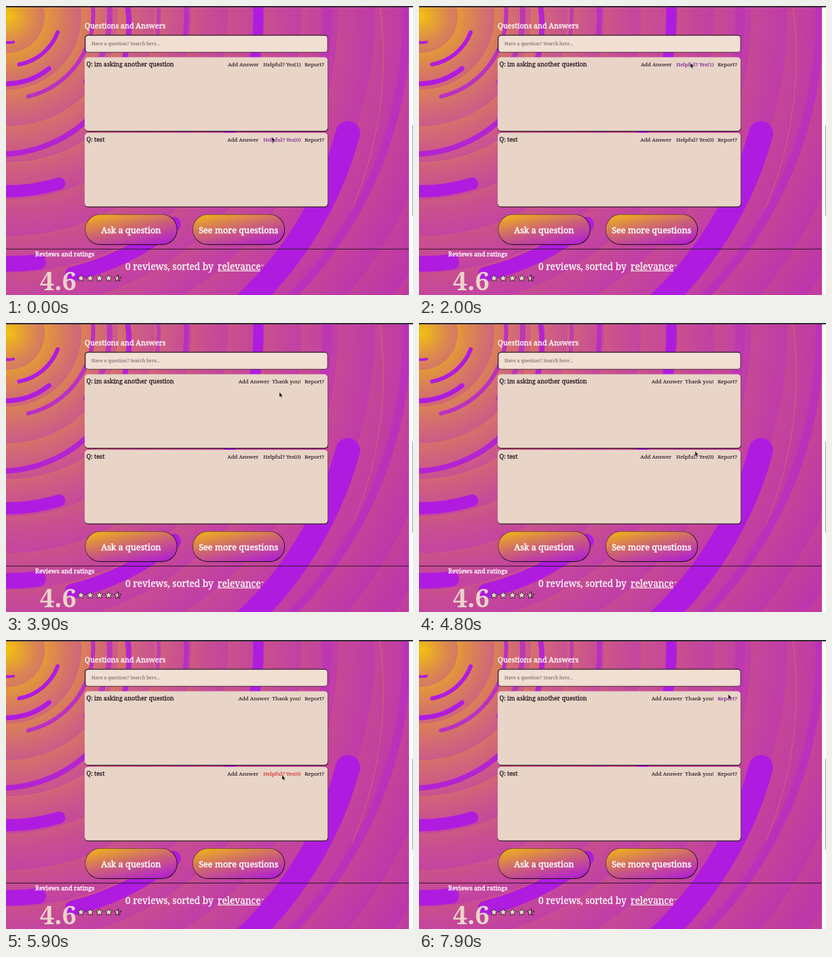
An HTML page that plays this animation: 600x426 px, repeating every 8000 ms.

```html
<!DOCTYPE html>
<html lang="en">
<head>
<meta charset="utf-8">
<title>Questions and Answers</title>
<style>
html, body { margin: 0; width: 100%; height: 100%; overflow: hidden; background: #fff; }
svg { display: block; width: 600px; height: 426px; }
text { font-family: "Noto Serif", "Liberation Serif", serif; fill: #2b1b24; stroke: #2b1b24; stroke-width: .12px; }
.white { fill: #fff; stroke: #fff; stroke-width: .35px; }
.q { font-size: 9px; stroke-width: .3px; }
.link { font-size: 7.85px; text-anchor: end; }
.hover { fill: #7a1a93; stroke: #7a1a93; }
.active { fill: #d32a2a; stroke: #d32a2a; }
.button { font-size: 12.7px; text-anchor: middle; stroke-width: .5px; }
.sort { font-size: 13.65px; stroke-width: .3px; }
</style>
</head>
<body>
<svg viewBox="0 0 600 426">
  <defs>
    <radialGradient id="base" gradientUnits="userSpaceOnUse" cx="3" cy="15" r="720">
      <stop offset="0" stop-color="#f3c30c"/>
      <stop offset=".055" stop-color="#e5a02f"/>
      <stop offset=".13" stop-color="#dc8551"/>
      <stop offset=".25" stop-color="#d46c70"/>
      <stop offset=".4" stop-color="#cb5587"/>
      <stop offset=".65" stop-color="#c64a94"/>
      <stop offset="1" stop-color="#c23d9c"/>
    </radialGradient>
    <radialGradient id="rings" gradientUnits="userSpaceOnUse" cx="3" cy="15" r="54" spreadMethod="repeat">
      <stop offset="0" stop-color="#b01be0" stop-opacity="0"/>
      <stop offset="1" stop-color="#b01be0" stop-opacity=".26"/>
    </radialGradient>
    <linearGradient id="pill" x1=".12" y1="-.05" x2=".85" y2="1.05">
      <stop offset="0" stop-color="#efb615"/>
      <stop offset=".5" stop-color="#cc6076"/>
      <stop offset="1" stop-color="#b01cd8"/>
    </linearGradient>
    <clipPath id="page"><rect width="594" height="426"/></clipPath>
  </defs>

  <g clip-path="url(#page)">
    <rect width="594" height="426" fill="url(#base)"/>
    <rect width="594" height="426" fill="url(#rings)"/>
    <g id="arcs" fill="none" stroke-linecap="round"></g>
    <path d="M0 358.3H594" stroke="#2b1526" stroke-width="1"/>
  </g>
  <rect width="600" height="2" fill="#302a35"/>
  <rect x="598.8" y="175" width="1.2" height="134" fill="#aaa"/>

  <text class="white" x="116" y="33" font-size="10.7">Questions and Answers</text>
  <rect x="116" y="42.5" width="358.5" height="26" rx="5" fill="#2b1c24"/>
  <rect x="117.3" y="43.8" width="356.4" height="24" rx="4" fill="#f0dfd2"/>
  <text x="126" y="58.3" font-size="6.8" style="fill:#66575a;stroke:none">Have a question? Search here...</text>

  <g id="cards"></g>
  <g id="buttons"></g>

  <text class="white" x="43" y="369" font-size="9.1">Reviews and ratings</text>
  <text class="white sort" x="176" y="388.5">0 reviews, sorted by</text>
  <text class="white sort" x="312" y="388.5">relevance</text>
  <path d="M312 390.6H375M376.3 381.3l1.8 1.8 1.8-1.8" fill="none" stroke="#fff"/>
  <text x="50" y="419" font-size="38" font-weight="700" style="fill:#ead5ca;stroke:none">4.6</text>
  <g id="stars" stroke="#2b1b24" stroke-width="1.4" stroke-linejoin="round" paint-order="stroke"></g>
  <path id="cursor" d="M0 0V7.2L1.7 5.7 2.9 8.3 4.1 7.7 2.9 5.2H5Z" fill="#171119" stroke="#eee" stroke-width=".35"/>
</svg>
<script>
const $ = id => document.getElementById(id);
const CX = 3, CY = 15, LOOP = 8000;

// A ring segment between two polar points; unequal radii make it spiral.
function arc(r0, deg0, r1, deg1, width, colour = '#b01be0', opacity = 1) {
  const at = (r, deg) => {
    const a = deg * Math.PI / 180;
    return `${(CX + r * Math.cos(a)).toFixed(1)} ${(CY + r * Math.sin(a)).toFixed(1)}`;
  };
  const r = (r0 + r1) / 2;
  return `<path d="M${at(r0, deg0)}A${r} ${r} 0 0 1 ${at(r1, deg1)}" stroke="${colour}" stroke-width="${width}" opacity="${opacity}"/>`;
}

$('arcs').innerHTML = [
  [39, 78, 39, 100, 4], [77, 18, 73, 77, 6], [98, 52, 100, 100, 7],
  [126, -10, 122, 76, 6, '#b01be0', .75], [150, -10, 150, 40, 8, '#b01be0', .6],
  [176, -10, 205, 100, 8, '#b01be0', .85],
  [222, -10, 222, 8, 6, '#b01be0', .5], [263, -10, 263, 8, 7, '#b01be0', .6],
  [258, 73, 258, 100, 18], [369, -10, 369, 30, 15],
  [365, 83, 365, 100, 23], [392, 51.5, 392, 76, 22], [530, 19, 551, 52, 36],
  [588, -10, 588, 50, 12, '#b01be0', .3], [470, -10, 470, 15, 14, '#b01be0', .25],
  [546, -4, 581, 29, 1, '#dd8d45', .5], [216, 30, 216, 100, 1, '#dd8d45', .5]
].map(a => arc(...a)).join('');

const card = (y, title, i) => `
  <rect x="116" y="${y + 1}" width="359" height="108.7" rx="5" fill="#2b1c24"/>
  <rect x="116" y="${y}" width="358.3" height="108.6" rx="5" fill="#e8d5c7"/>
  <text class="q" x="118.5" y="${y + 13}">${title}</text>
  <text class="link" id="add${i}" y="${y + 13}">Add Answer</text>
  <text class="link" id="help${i}" x="434.8" y="${y + 13}"></text>
  <text class="link" id="report${i}" x="469" y="${y + 13}">Report?</text>`;
$('cards').innerHTML = card(75.5, 'Q: im asking another question', 0) + card(187, 'Q: test', 1);

const button = (x, label) => `
  <rect x="${x}" y="307" width="136.3" height="45.3" rx="22.6" fill="#2b1526"/>
  <rect x="${x + .6}" y="307.6" width="134.6" height="43.5" rx="21.7" fill="url(#pill)"/>
  <text class="white button" x="${x + 67.8}" y="335">${label}</text>`;
$('buttons').innerHTML = button(116.5, 'Ask a question') + button(275, 'See more questions');

function star(x, y) {
  const points = Array.from({ length: 10 }, (_, i) => {
    const r = i % 2 ? 2.2 : 4.9, a = i * Math.PI / 5;
    return `${(x + r * Math.sin(a)).toFixed(1)},${(y - r * Math.cos(a)).toFixed(1)}`;
  });
  const half = [points[0], ...points.slice(5)];
  const shape = (p, fill) => `<polygon points="${p.join(' ')}" fill="${fill}"/>`;
  return x < 160 ? shape(points, '#ead5ca') : shape(points, '#b455a0') + shape(half, '#ead5ca');
}
$('stars').innerHTML = [0, 1, 2, 3, 4].map(i => star(110.5 + i * 13.6, 401.3)).join('');

// time, x and y of the pointer tip
const path = [
  [0, 392, 193], [600, 392, 193], [1600, 400, 84], [3100, 400, 84],
  [3900, 403, 102], [4800, 407, 189], [5300, 407, 199], [6200, 407, 199],
  [6900, 420, 171], [7900, 456, 80], [8000, 456, 80]
];

function pointer(t) {
  const i = path.findIndex(p => p[0] > t);
  const [t0, x0, y0] = path[i - 1], [t1, x1, y1] = path[i];
  const k = (t - t0) / (t1 - t0), s = k * k * (3 - 2 * k);
  return [x0 + (x1 - x0) * s, y0 + (y1 - y0) * s];
}

const clicks = [2900, 5900];
const labels = ['Helpful? Yes(1)', 'Helpful? Yes(0)'];

function draw(now) {
  const t = Math.floor(now % LOOP / 100) * 100;
  const [x, y] = pointer(t);
  $('cursor').setAttribute('transform', `translate(${x} ${y})`);
  clicks.forEach((click, i) => {
    const thanked = t >= click + 200, pressed = t >= click && !thanked;
    const top = 79 + i * 112;
    const over = (left, right) => x > left && x < right && y > top && y < top + 12;
    const help = $('help' + i);
    help.textContent = thanked ? 'Thank you!' : labels[i];
    help.setAttribute('class', 'link' + (pressed ? ' active' : !thanked && over(377, 435) ? ' hover' : ''));
    $('add' + i).setAttribute('x', thanked ? 388.5 : 372.8 - i * .6);
    $('report' + i).setAttribute('class', 'link' + (over(440, 469) ? ' hover' : ''));
  });
  requestAnimationFrame(() => draw(performance.now()));
}
draw(performance.now());
</script>
</body>
</html>
```
